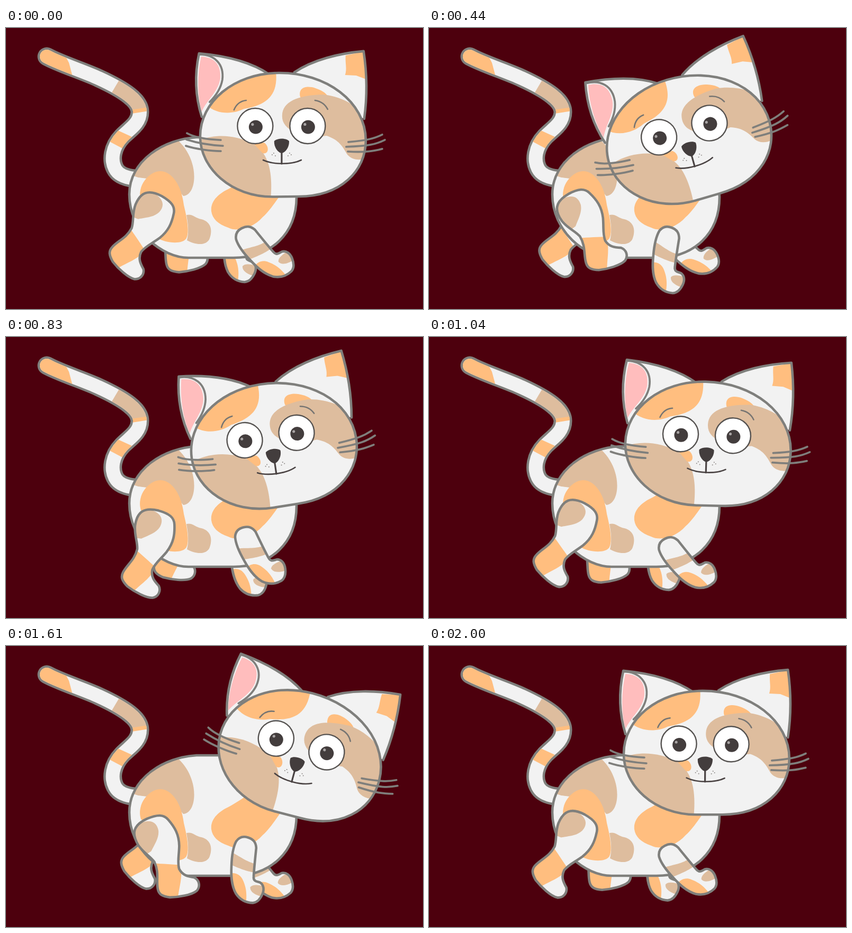
Recreate the animation shown at these times as an HTML page. Size 788 by 532 pixels, loop 2.03 s.

```html
<!DOCTYPE html>
<html lang="en">
<head>
<meta charset="utf-8">
<title>Walking cat</title>
<style>
  html, body { margin: 0; width: 100%; height: 100%; overflow: hidden; background: #4d000d; }
  svg { display: block; width: 788px; height: 532px; }
  .fur { fill: #f2f2f2; }
  .line { fill: none; stroke: #7f7f7c; stroke-width: 4.6; stroke-linecap: round; stroke-linejoin: round; }
  .orange { fill: #ffbe7f; }
  .tan { fill: #debd9e; }
  .dark { fill: #433d3d; }
  .thin { fill: none; stroke: #777572; stroke-width: 2.6; stroke-linecap: round; }
  .mouth { fill: none; stroke: #4a4343; stroke-width: 2.6; stroke-linecap: round; }
  .whisker { fill: none; stroke: #7f7f7c; stroke-width: 3.8; stroke-linecap: round; }
  .eye { fill: #fff; stroke: #555250; stroke-width: 2.4; }
</style>
</head>
<body>
<svg viewBox="0 0 788 532">
  <defs>
    <path id="tailPath" d="M77 54C100 67 150 83 175 95C225 118 253 138 253 159C253 180 235 190 220 205C200 226 198 250 206 266C212 278 225 283 242 285"/>
    <path id="bodyPath" d="M360 207C300 210 233 250 233 315C233 385 295 435 345 435L430 435C500 435 549 390 549 320C549 260 480 207 400 207Z"/>
    <path id="headPath" d="M367 205C367 140 430 86 515 85C605 84 680 140 680 213C680 270 633 319 553 319L505 319.5C425 320 367 265 367 205Z"/>
    <path id="hindPath" d="M278 301C300 301 310 306 314 318C320 336 322 352 314 372C306 390 299 398 297 412C298 426 307 432 317 438C324 446 322 458 312 463C300 467 275 461 260 455C248 448 243 442 245 432C248 416 260 404 259 382C256 368 246 358 243 340C240 316 248 302 278 301Z"/>
    <path id="frontPath" d="M453 384C464 384 470 388 474 398C477 412 482 436 486 451C488 460 494 458 501 458C509 460 513 468 512 478C511 488 507 496 500 499C487 503 474 500 464 492C450 479 444 460 440 445C435 428 432 410 434 398C437 388 444 384 453 384Z"/>
    <clipPath id="bodyClip"><use href="#bodyPath"/></clipPath>
    <clipPath id="headClip"><use href="#headPath"/></clipPath>
    <clipPath id="hindClip"><use href="#hindPath"/></clipPath>
    <clipPath id="frontClip"><use href="#frontPath"/></clipPath>
    <clipPath id="tipClip"><rect x="59" width="729" height="532"/></clipPath>
    <mask id="tailMask" maskUnits="userSpaceOnUse" x="0" y="0" width="788" height="532">
      <use href="#tailPath" fill="none" stroke="#fff" stroke-width="26" stroke-linecap="round"/>
    </mask>

    <g id="hind">
      <use href="#hindPath" class="fur"/>
      <g clip-path="url(#hindClip)">
        <path class="tan" d="M235 300L268 304C286 306 292 316 289 330C285 343 274 350 261 361L235 365Z"/>
        <path class="orange" d="M250 381C266 388 282 396 302 406L299 418C292 436 282 446 272 465L235 455Z"/>
      </g>
      <use href="#hindPath" class="line"/>
    </g>
    <g id="front">
      <use href="#frontPath" class="fur"/>
      <g clip-path="url(#frontClip)">
        <path class="tan" d="M430 420C450 422 462 429 484 427L488 443C470 446 460 445 435 443Z"/>
        <path class="orange" d="M440 460C452 453 462 456 469 464C478 474 484 484 488 505L460 505Z"/>
        <path class="tan" d="M518 463C504 462 489 464 486 472C488 481 500 484 518 482Z"/>
      </g>
      <use href="#frontPath" class="line"/>
    </g>
  </defs>

  <rect width="788" height="532" fill="#4d000d"/>

  <g clip-path="url(#tipClip)">
    <use href="#tailPath" class="line" style="stroke-width:35"/>
    <use href="#tailPath" class="line" style="stroke:#f2f2f2;stroke-width:26"/>
    <g mask="url(#tailMask)">
      <path class="orange" d="M50 30L108 45L119 66L127 96L50 90Z"/>
      <path class="tan" d="M216 95L280 130L268 151L236 156L200 122Z"/>
      <path class="orange" d="M236 155L270 150L270 157L238 162Z"/>
      <path class="orange" d="M205 191L240 207L222 229L190 212Z"/>
    </g>
  </g>

  <use href="#hind" id="farHind"/>
  <use href="#front" id="farFront"/>

  <use href="#bodyPath" class="fur"/>
  <g clip-path="url(#bodyClip)">
    <path class="tan" d="M225 275L250 283C300 288 320 300 335 318C362 316 366 250 325 213L225 205Z"/>
    <path class="orange" d="M255 328C246 300 270 271 292 271C315 272 332 300 336 335C342 360 347 385 341 398C333 411 300 407 285 397C275 370 268 335 255 328Z"/>
    <path class="tan" d="M341 354C352 351 358 360 369 362C389 367 390 385 385 398C380 412 360 412 342 402C346 386 344 370 341 354Z"/>
    <path class="orange" d="M388 347C386 327 403 313 420 305C440 294 455 284 470 270L530 300C515 320 500 345 485 358C465 381 435 386 420 378C400 371 390 361 388 347Z"/>
  </g>
  <use href="#bodyPath" class="line"/>

  <use href="#hind" id="nearHind"/>
  <use href="#front" id="nearFront"/>

  <g id="head">
    <path class="fur" d="M370 168C358 130 356 90 365 48C410 52 460 62 498 88L440 150Z"/>
    <path fill="#ffbdbd" d="M369 54C395 55 407 70 405 95C402 120 380 136 370 158C362 130 361 90 369 54Z"/>
    <path class="line" d="M370 168C358 130 356 90 365 48C410 52 460 62 498 88"/>
    <path class="line" style="stroke-width:3.8" d="M366 50C394 50 413 68 409 98C406 115 397 128 385 140"/>
    <path class="fur" d="M545 84C580 60 630 48 676 44C683 90 683 130 677 172L610 150Z"/>
    <path class="orange" d="M642 52L675 45L680 97L662 90L641 89C645 77 641 68 642 52Z"/>
    <path class="line" d="M545 84C580 60 630 48 676 44C683 90 683 130 677 172"/>

    <use href="#headPath" class="fur"/>
    <g clip-path="url(#headClip)">
      <path class="orange" d="M378 145C400 165 430 163 450 153C490 146 516 130 510 80L440 75L370 120Z"/>
      <path class="orange" d="M556 130C552 111 570 109 585 114C600 119 608 126 609 132L560 138Z"/>
      <path class="tan" d="M522 165C523 140 550 127 600 126C640 130 680 155 695 190L695 240C672 255 652 250 644 238C634 220 626 211 606 204C570 208 520 198 522 165Z"/>
      <path class="tan" d="M355 217C390 199 430 201 465 218C490 232 506 260 500 325L355 325Z"/>
      <path class="orange" d="M468 219L488 217C498 224 497 240 485 237Z"/>
    </g>
    <use href="#headPath" class="line"/>

    <g id="eyes"></g>
    <path class="thin" d="M431 155C436 143 444 138 454 137M584 137C597 139 604 146 608 154"/>
    <path class="mouth" d="M521 234V257" style="stroke-width:3.2"/>
    <path class="mouth" d="M486 250C505 259 540 259 558 250"/>
    <path class="dark" d="M507 214C513 208 529 208 535 214C536 225 528 236 521 237C514 236 506 225 507 214Z"/>
    <g id="dots" fill="#8a8583"></g>
    <path class="whisker" d="M342 199C356 207 383 211 406 212M341 211C363 218 388 222 410 223M340 223C358 229 388 233 406 233"/>
    <path class="whisker" d="M647 216C680 213 695 210 711 202M643 225C685 224 700 220 716 212M646 234C680 236 695 233 711 229"/>
  </g>
</svg>
<script>
const LOOP = 2030, STRIDE = 1005;
const $ = id => document.getElementById(id);

$('eyes').innerHTML = [471, 570].map(x => `
  <circle class="eye" cx="${x}" cy="185.5" r="33.5"/>
  <circle class="dark" cx="${x + 1}" cy="187.5" r="13"/>
  <circle cx="${x - 5}" cy="182.5" r="2.6" fill="#a9a5a5"/>`).join('');

// Three freckles mirrored on each side of the muzzle.
$('dots').innerHTML = [-1, 1].map(side => [12, 15, 18].map((d, i) =>
  `<circle cx="${521 + side * d}" cy="${242 - 4 * (i % 2) - i}" r="1"/>`).join('')).join('');

const HIP = [266, 333], SHOULDER = [459, 433];

// Each foot traces a tilted ellipse while the leg swings: c and s are the
// cosine and sine of the stride; near and far legs move against each other.
const legs = {
  nearHind:  [HIP, (c, s) => [268, 347 - 7 * c - 14 * s, 30 * c - 2 * s]],
  farHind:   [HIP, (c, s) => [282 - 3 * c - 10 * s, 340 + 10 * c + 13 * s, 4 - 30 * c - 4 * s]],
  nearFront: [SHOULDER, (c, s) => [459 + 14 * c, 420 + 15 * s, -2 - 25 * c]],
  farFront:  [SHOULDER, (c, s) => [456 - 21 * c, 413 - 8 * c - 9 * s, -6 + 26 * c - 3 * s]]
};

function draw(t) {
  const turn = 2 * Math.PI * t / STRIDE;
  for (const [id, [rest, pose]] of Object.entries(legs)) {
    const [x, y, angle] = pose(Math.cos(turn), Math.sin(turn));
    $(id).setAttribute('transform',
      `translate(${x} ${y}) rotate(${angle}) translate(${-rest[0]} ${-rest[1]})`);
  }
  // The head rocks once for every two strides.
  $('head').setAttribute('transform', `rotate(${-16 * Math.sin(turn / 2)} 530 328)`);
}

const start = performance.now();
function tick() {
  draw((performance.now() - start) % LOOP);
  requestAnimationFrame(tick);
}
tick();
</script>
</body>
</html>
```
